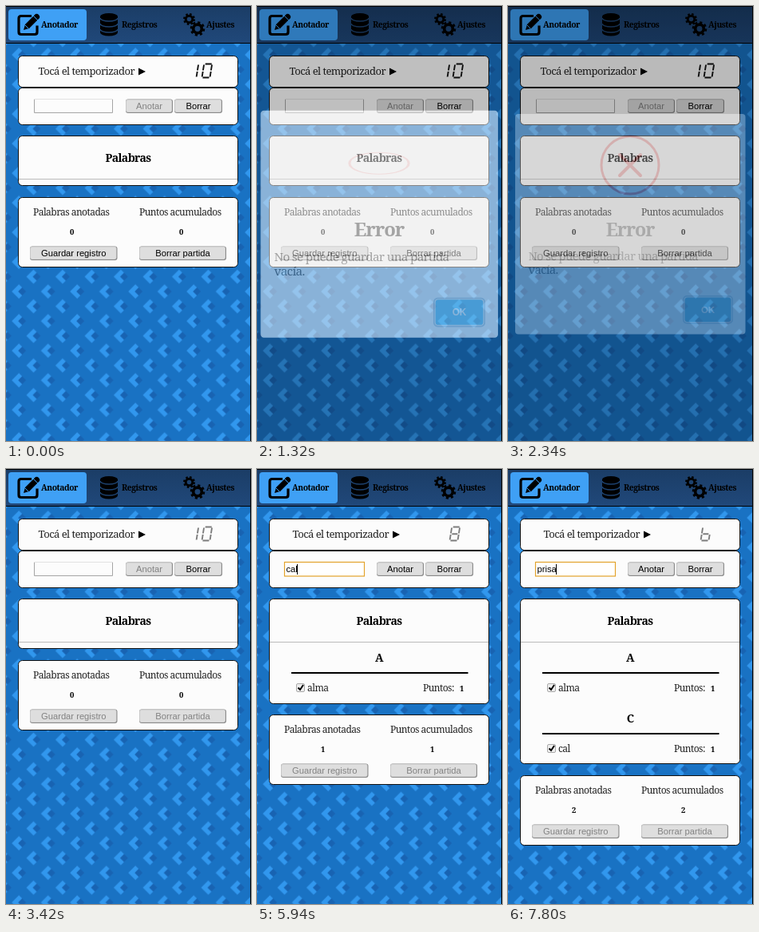
Animation, 307 px wide and 544 px high, one loop 8 s. Source, as an HTML page:

```html
<!DOCTYPE html>
<html lang="es">
<head>
<meta charset="utf-8">
<title>Anotador</title>
<style>
html, body { margin: 0; width: 100%; height: 100%; overflow: hidden; background: #1972c3; }
svg { display: block; width: 307px; height: 544px; }
text { font: 12px "Noto Serif", serif; letter-spacing: -.045em; fill: #222; white-space: pre; }
.mid { text-anchor: middle; }
.nav { font-size: 10.3px; font-weight: 700; fill: #000; }
.head { font-size: 14px; font-weight: 700; fill: #000; text-anchor: middle; }
.num { font-size: 9.5px; font-weight: 700; fill: #000; }
.ui { font: 11.2px "Liberation Sans", Arial, sans-serif; letter-spacing: 0; fill: #000; }
.off { fill: #828282; }
.panel { fill: #fcfcfc; stroke: #111; }
.line { fill: none; stroke: #000; }
</style>
</head>
<body>
<svg viewBox="0 0 307 544">
  <defs>
    <g id="gem">
      <path d="M0-9 9 0 0 9-9 0Z" fill="#1863b2"/>
      <path d="M0-9-9 0 0 9 4 5-1 0 4-5Z" fill="#3197ee"/>
    </g>
    <pattern id="gems" width="36.5" height="37" x="7.1" y="14.75" patternUnits="userSpaceOnUse">
      <use href="#gem" x="9.1" y="9.25"/><use href="#gem" x="27.35" y="27.75"/>
    </pattern>
    <linearGradient id="bar" x2="0" y2="1">
      <stop stop-color="#1b3d66"/><stop offset="1" stop-color="#20487a"/>
    </linearGradient>
    <g id="gear" class="line">
      <circle r="5.2" stroke-width="3.6"/>
      <circle r="7.6" stroke-width="3" stroke-dasharray="2.98"/>
    </g>
  </defs>
  <rect width="307" height="544" fill="#1972c3"/>
  <rect width="307" height="544" fill="url(#gems)"/>

  <rect width="307" height="46" fill="url(#bar)"/>
  <path class="line" d="M0 46.5h307"/>
  <rect x="3" y="4" width="98" height="39" rx="4" fill="#3fa0f5"/>
  <path class="line" stroke-width="3.2" d="M32 12.500H19q-3 0-3 3v17q0 3 3 3h17q3 0 3-3v-8"/>
  <path d="M22 30l2-7L37 10q2-1 4 1t1 4L29 28Z"/>
  <path stroke="#3fa0f5" d="M34 12l6 6M24 24l4 4"/>
  <path d="M118 13a11 4 0 0 1 22 0v20a11 4.5 0 0 1-22 0Z"/>
  <path fill="none" stroke="#1d426f" stroke-width="1.4" d="M118 15a11 4 0 0 0 22 0M118 22a11 4 0 0 0 22 0M118 29a11 4 0 0 0 22 0"/>
  <use href="#gear" transform="translate(229.500 16.500) scale(.82)"/>
  <use href="#gear" transform="translate(240 28.500) scale(1.02)"/>
  <text class="nav" x="44" y="27">Anotador</text>
  <text class="nav" x="145" y="27">Registros</text>
  <text class="nav" x="251" y="27">Ajustes</text>

  <rect class="panel" x="15.5" y="62.5" width="275" height="39" rx="5"/>
  <g id="label">
    <text x="40.5" y="86" style="font-size:13.1px">Tocá el temporizador</text>
    <path d="M166 77.5 175 82l-9 4.5Z"/>
  </g>
  <path id="digits" fill="none" stroke-width="1.9" transform="translate(241.5 89.5) skewX(-9)"/>

  <rect class="panel" x="15.5" y="102.5" width="275" height="46" rx="5"/>
  <path fill="none" stroke="#a5a5a5" d="M35.5 116v17.5h98V116"/>
  <path stroke="#e2e2e2" d="M35 116.5h99"/>
  <rect id="focus" x="34.5" y="116.5" width="100" height="17.5" fill="#fff" stroke="#e3a32c" stroke-width="1.2"/>
  <text id="typed" class="ui" x="36.5" y="129"></text>
  <rect id="caret" y="119" width="1" height="13"/>
  <g id="buttons"></g>

  <rect id="list" class="panel" x="15.5" y="162.5" width="275" rx="5"/>
  <text class="head" x="153" y="195">Palabras</text>
  <path stroke="#bbb" d="M16 216.5h274"/>
  <g id="rows"></g>

  <g id="totals">
    <rect class="panel" x="15.5" y="239.5" width="275" height="87" rx="5"/>
    <text x="34" y="262">Palabras anotadas</text>
    <text x="167" y="262">Puntos acumulados</text>
    <text class="num mid count" x="82.5" y="286"></text>
    <text class="num mid count" x="219.5" y="286"></text>
    <g id="saving"></g>
  </g>

  <g id="overlay">
    <rect width="307" height="544" opacity=".4"/>
    <g id="modal">
      <rect x="9" y="135" width="288.5" height="275.5" rx="4" fill="#fff"/>
      <g id="icon" fill="none" stroke="#f27474">
        <circle r="36" stroke-width="3"/>
        <path id="cross" d="M-13-13 13 13M13-13-13 13" stroke-width="4" stroke-linecap="round"/>
      </g>
      <g fill-opacity=".62">
        <text class="mid" x="153" y="288" style="font-size:23.2px;font-weight:700;fill:#000">Error</text>
        <text x="25.5" y="318" style="font-size:14.8px;fill:#000">No se puede guardar una partida</text>
        <text x="25.5" y="335" style="font-size:14.8px;fill:#000">vacía.</text>
      </g>
      <rect x="219" y="362" width="63" height="35.5" rx="5" fill="#c2d6e4"/>
      <rect x="220.5" y="363.5" width="60" height="32.5" rx="4" fill="#fff"/>
      <rect id="ok" x="221.5" y="364.5" width="58" height="30.5" rx="3.5"/>
      <text class="ui mid" x="250.5" y="384" style="font-weight:700;font-size:11.5px;fill:#fff">OK</text>
    </g>
  </g>
  <path class="line" d="M0 .5h306.5V544"/>
</svg>
<script>
const $ = id => document.getElementById(id);
const set = (id, name, value) => $(id).setAttribute(name, value);
const show = (node, on) => node.setAttribute('visibility', on ? 'visible' : 'hidden');
const clamp = x => Math.min(1, Math.max(0, x));
const mix = (a, b, k) => a + (b - a) * k;

// CSS "ease": cubic-bezier(.25, .1, .25, 1)
function ease(x) {
  const curve = (s, a, b) => 3 * s * (1 - s) ** 2 * a + 3 * s * s * (1 - s) * b + s ** 3;
  let lo = 0, hi = 1;
  x = clamp(x);
  for (let i = 0; i < 20; i++) {
    const s = (lo + hi) / 2;
    if (curve(s, .25, .25) < x) lo = s; else hi = s;
  }
  return curve(lo, .1, 1);
}

// Eased keyframes: [[position, value], ...]
function keyed(x, keys) {
  x = clamp(x);
  const i = Math.max(1, keys.findIndex(k => x <= k[0]));
  const [[p, a], [q, b]] = [keys[i - 1], keys[i]];
  return mix(a, b, ease((x - p) / (q - p)));
}

const button = (x, y, w, label) => `
  <rect x="${x}" y="${y}" width="${w}" height="17.5" rx="3" fill="#8a8a8a"/>
  <rect x="${x}" y="${y}" width="${w - 1}" height="16.5" rx="3" fill="#c8c8c8"/>
  <rect x="${x + 1}" y="${y + 1}" width="${w - 2.5}" height="15" rx="2" fill="#dedede"/>
  <text class="ui mid" x="${x + w / 2}" y="${y + 12.5}">${label}</text>`;
$('buttons').innerHTML = button(150, 116.5, 59, 'Anotar') + button(211, 116.5, 60, 'Borrar');
$('saving').innerHTML = button(30, 300.5, 109.5, 'Guardar registro') + button(167, 300.5, 109, 'Borrar partida');

const row = (letter, word, y) => `<g transform="translate(0 ${y})">
  <text class="head" x="153" y="241">${letter}</text>
  <path class="line" stroke-width="2" d="M43 255h221.5"/>
  <rect x="49.5" y="268.5" width="10" height="10" rx="1.5" fill="#eee" stroke="#aaa"/>
  <path class="line" stroke="#333" stroke-width="2" d="M51.5 273.5l2.5 2.5 4-6"/>
  <text x="63" y="278">${word}</text>
  <text x="208" y="278">Puntos:</text><text class="num" x="254" y="278">1</text></g>`;
$('rows').innerHTML = row('A', 'alma', 0) + row('C', 'cal', 76);

const typing = [
  [4020, ''], [4380, 'a'], [4560, 'al'], [4620, 'alm'], [4740, 'alma'],
  [4960, ''], [5760, 'c'], [5880, 'ca'], [5940, 'cal'],
  [6400, ''], [7260, 'p'], [7560, 'pr'], [7620, 'pri'], [7740, 'pris'], [7800, 'prisa']];
const ticks = [4380, 5340, 6360, 7380];
const segments = {
  a: 'M1.5-17h8', b: 'M10-16v7', c: 'M10-7.5v6.5', d: 'M1 0h8',
  e: 'M0-7.5v6.5', f: 'M0-16v7', g: 'M1.5-8.3h7' };
const shapes = { 6: 'cdefg', 7: 'abcf', 8: 'abcdefg', 9: 'abcdfg' };
const digit = lit => [...lit].map(s => segments[s]).join('');

function drawTimer(t) {
  const left = 10 - ticks.filter(k => t >= k).length;
  set('digits', 'd', left > 9 ? 'M-3-16v7M-3-7.5v6.5' +
    digit('abcdef').replace(/M(\d+\.?\d*)/g, (m, x) => 'M' + (+x + 4)) : digit(shapes[left]));
  set('digits', 'stroke', t < 3420 ? '#111' : '#7c7c7c');
  set('label', 'transform', `translate(${left > 9 ? 0 : 4} 0)`);
}

function drawForm(t) {
  const running = t >= 3420, focused = t >= 4020;
  const [since, word] = typing.filter(k => t >= k[0]).pop() || typing[0];
  $('typed').textContent = word;
  show($('focus'), focused);
  show($('caret'), focused && Math.floor((t - since) / 500) % 2 === 0);
  set('caret', 'x', 36 + (word ? Math.round($('typed').getComputedTextLength()) : 0));
  $('buttons').querySelector('text').classList.toggle('off', word.length < 3);
  $('saving').querySelectorAll('text').forEach(e => e.classList.toggle('off', running));
}

function drawList(t) {
  const n = (t >= 4960) + (t >= 6400);
  set('list', 'height', [62, 131, 206][n]);
  set('totals', 'transform', `translate(0 ${[0, 68, 144][n]})`);
  [...$('rows').children].forEach((g, i) => show(g, i < n));
  document.querySelectorAll('.count').forEach(e => e.textContent = n);
}

function drawModal(t) {
  const age = t - 1217, gone = t - 2275;
  show($('overlay'), age >= 0 && gone < 300);
  set('overlay', 'opacity', ease(age / 300) - ease(gone / 300));
  set('modal', 'opacity', ease(age / 200) - ease(gone / 200));
  const zoom = keyed(age / 300, [[0, 1], [.01, .5], [.45, 1.05], [.8, .95], [1, 1]]);
  set('modal', 'transform', `translate(153 272.5) scale(${zoom}) translate(-153 -272.5)`);

  const turn = ease(age / 500);
  const tilt = Math.cos(mix(100, 0, turn) * Math.PI / 180);
  set('icon', 'transform', `translate(153 199) scale(1 ${tilt})`);
  set('icon', 'opacity', turn);
  const x = age / 500;
  const size = keyed(x, [[0, .4], [.5, .4], [.8, 1.15], [1, 1]]);
  const drop = keyed(x, [[0, 26], [.5, 26], [.8, -6], [1, 0]]);
  set('cross', 'transform', `translate(0 ${drop}) scale(${size})`);
  set('cross', 'opacity', keyed(x, [[0, 0], [.5, 0], [1, 1]]));
  set('ok', 'fill', gone < 0 ? '#7cd1f9' : '#70bce0');
}

const start = performance.now();
function frame() {
  const t = (performance.now() - start) % 8000;
  drawTimer(t);
  drawForm(t);
  drawList(t);
  drawModal(t);
  requestAnimationFrame(frame);
}
frame();
</script>
</body>
</html>
```
